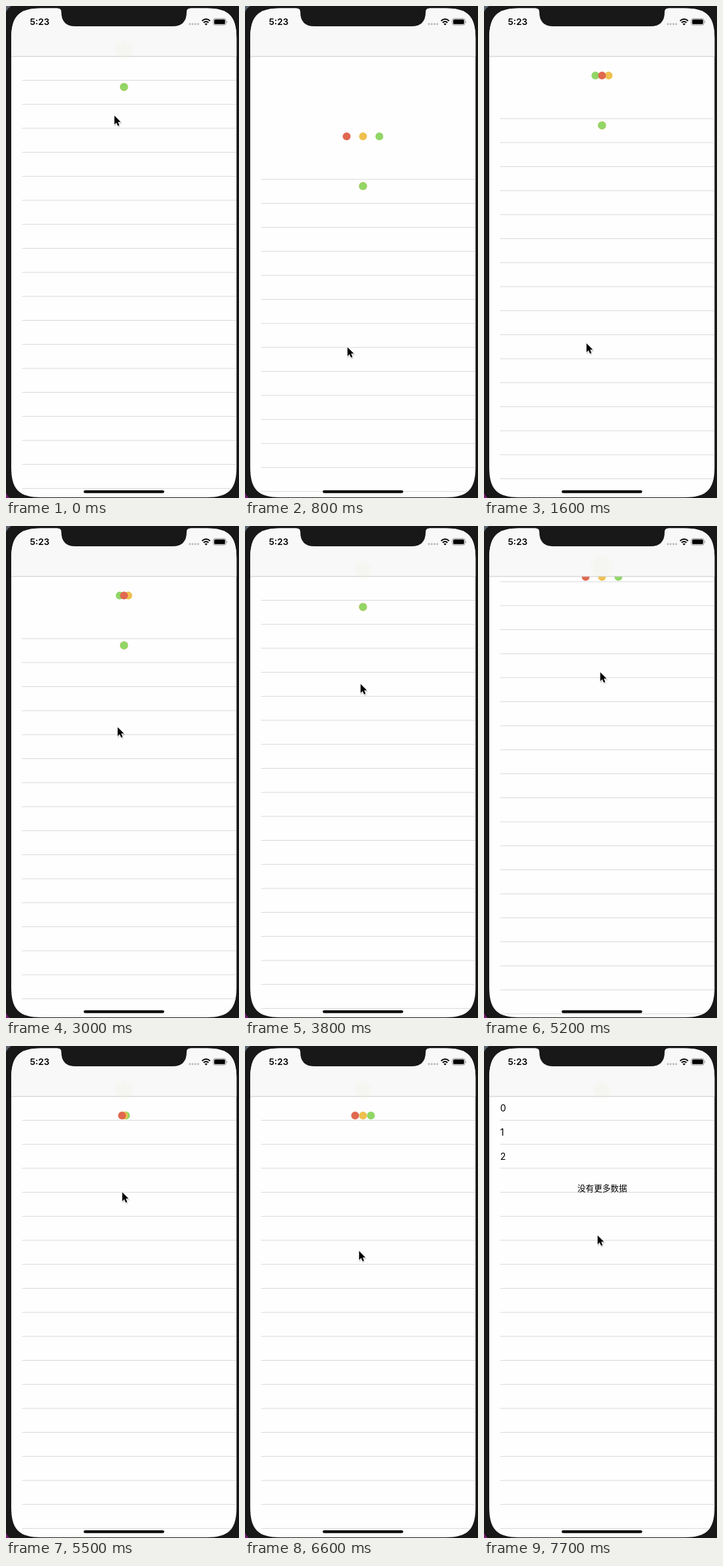
An HTML page for the animation above (8 s loop, 356 by 752 pixels).

```html
<!DOCTYPE html>
<html lang="zh">
<head>
<meta charset="utf-8">
<title>Pull to refresh</title>
<style>
  html, body { margin: 0; width: 100%; height: 100%; overflow: hidden; background: #181818; }
  svg { display: block; width: 356px; height: 752px; }
  .clock { font: 600 13.6px Inter, "Liberation Sans", sans-serif; }
  .row { font: 400 14.2px Inter, "Liberation Sans", sans-serif; }
  .note { font: 400 12.7px "Noto Sans CJK SC", "Noto Sans CJK", sans-serif; }
</style>
</head>
<body>
<svg viewBox="0 0 356 752">
  <defs>
    <clipPath id="screen"><path id="outline"/></clipPath>
    <radialGradient id="haze">
      <stop offset=".5" stop-color="#dfe6c0" stop-opacity=".13"/>
      <stop offset="1" stop-color="#dfe6c0" stop-opacity="0"/>
    </radialGradient>
    <path id="arrow" d="M0 0V15.5L3.6 12.2L6 17.8L8.6 16.7L6.2 11.2H11Z"/>
  </defs>

  <rect width="356" height="752" fill="#181818"/>
  <path d="M0 0H8Q3 3 0 9Z" fill="#5d6772"/>
  <path d="M0 744Q2 749 6 752H0Z" fill="#7a1a72"/>

  <g clip-path="url(#screen)">
    <rect width="356" height="752" fill="#fefefe"/>
    <g id="lines" fill="#d9d9da"></g>
    <g id="rows"></g>
    <text id="note" class="note" x="180.7" y="221.6" text-anchor="middle">没有更多数据</text>
    <g id="head"></g>
    <g id="foot"></g>
    <rect width="356" height="77" fill="#f8f8f8"/>
    <rect y="76.6" width="356" height="1" fill="#cbcbcb"/>
    <circle id="glow" cx="180" fill="url(#haze)"/>
  </g>

  <path d="M79 0V3.5Q84.5 3.5 84.5 9Q84.5 31 106 31H254.500Q276 31 276 9Q276 3.500 281.500 3.500V0Z" fill="#181818"/>
  <text class="clock" x="36.5" y="29">5:23</text>
  <g id="signal" fill="#bdbdbd"></g>
  <g fill="none" stroke="#000" stroke-width="2">
    <path d="M299.6 22.8Q305.7 17.2 311.8 22.8"/>
    <path d="M302 25.4Q305.7 22 309.4 25.4"/>
  </g>
  <path d="M303.5 27.3Q305.7 25.6 307.9 27.3L305.7 29.6Z"/>
  <rect x="316.7" y="19.2" width="19.4" height="10" rx="2.8" fill="none" stroke="#8d8d8d" stroke-width=".9"/>
  <rect x="318.1" y="20.6" width="16.6" height="7.2" rx="1.6"/>
  <path d="M337.1 22.4Q339 24.2 337.1 26Z" fill="#8d8d8d"/>
  <rect x="118.7" y="740.2" width="123" height="4.2" rx="2.1"/>

  <g id="cursor">
    <use href="#arrow" x=".8" y="2" stroke="#000" stroke-width="1.5" opacity=".16"/>
    <use href="#arrow" stroke="#fff" stroke-width="1.4" paint-order="stroke"/>
  </g>
</svg>
<script>
const LOOP = 8000, STEP = 100;
const PITCH = 36.7, FIRST = 113, MID = 180.3, SPREAD = 25, TRIGGER = 58.6;
const HALF = 239;                       // time for the dots to close or open
const HEAD_FREE = 1000, HEAD_ON = 1265, HEAD_OFF = 3265;
const PULL = 4600, FOOT_FREE = 5050, FOOT_ON = 5290, LOADED = 7400;
const COLORS = ['#e0684f', '#efc050', '#91d666'];

const $ = id => document.getElementById(id);
const clamp = v => Math.max(0, Math.min(1, v));
const smooth = u => u * u * (3 - 2 * u);
const show = (el, on) => el.setAttribute('visibility', on ? 'visible' : 'hidden');

function add(parent, tag, attrs) {
  const el = document.createElementNS('http://www.w3.org/2000/svg', tag);
  for (const k in attrs) el.setAttribute(k, attrs[k]);
  return parent.appendChild(el);
}

// Rounded box whose corners curve in gradually
function softBox(l, t, r, b, reach, pull) {
  return `M${l} ${t + reach}C${l} ${t + pull} ${l + pull} ${t} ${l + reach} ${t}
    H${r - reach}C${r - pull} ${t} ${r} ${t + pull} ${r} ${t + reach}
    V${b - reach}C${r} ${b - pull} ${r - pull} ${b} ${r - reach} ${b}
    H${l + reach}C${l + pull} ${b} ${l} ${b - pull} ${l} ${b - reach}Z`;
}
$('outline').setAttribute('d', softBox(8, 3.5, 352.2, 751, 46, 12));

// Pointer stops: time, x, y
const stops = [
  [0, 166, 168], [800, 157, 522], [1600, 157, 516], [3000, 171, 308], [3600, 177, 242],
  [3800, 177, 242], [PULL, 177, 532], [4940, 178, 224], [5500, 178, 224], [6200, 175, 324], [7300, 174, 290]
];

function pointerAt(t) {
  const i = Math.max(1, stops.findIndex(s => t < s[0]));
  const [a, b] = t < stops.at(-1)[0] ? [stops[i - 1], stops[i]] : stops.slice(-2);
  const u = smooth(clamp((t - a[0]) / (b[0] - a[0])));
  return { x: a[1] + (b[1] - a[1]) * u, y: a[2] + (b[2] - a[2]) * u };
}

// Rubber-band resistance while dragging, and the decelerating return
const rubber = d => 682 * (1 - 1 / (Math.max(0, d) * 0.55 / 682 + 1));
const glide = (from, to, t, time) => to + (from - to) * (1 - clamp(t / time)) ** 3;
const dragDown = t => rubber(pointerAt(t).y - 168);
const dragUp = t => -rubber(479 - pointerAt(t).y);

function scrollAt(t) {
  if (t < HEAD_FREE) return dragDown(t);
  if (t < HEAD_OFF) return glide(dragDown(HEAD_FREE), TRIGGER, t - HEAD_FREE, 450);
  if (t < PULL) return glide(TRIGGER, 0, t - HEAD_OFF, 335);
  if (t < FOOT_FREE) return dragUp(t);
  return glide(dragUp(FOOT_FREE), 0, t - FOOT_FREE, 400);
}

const lines = Array.from({ length: 24 }, () => add($('lines'), 'rect', { x: 24.5, width: 328, height: 1 }));
for (let i = 0; i < 3; i++)
  add($('rows'), 'text', { class: 'row', x: 24.8, y: 100.3 + i * PITCH }).textContent = i;
for (let i = 0; i < 4; i++)
  add($('signal'), 'circle', { cx: 281 + i * 4.2, cy: 27.6, r: 1.6 });

const makeDots = id => [0, 1, 2].map(() => add($(id), 'circle', { r: 6 }));
const head = makeDots('head'), foot = makeDots('foot');

// Dots open with the pull; once loading they close, move one place on and reopen.
function setDots(dots, y, pull, elapsed) {
  const busy = elapsed >= 0;
  const shift = busy ? Math.floor((elapsed + HALF) / (2 * HALF)) : 0;
  const gap = SPREAD * (busy ? Math.abs(1 - (elapsed / HALF) % 2) : clamp(pull / TRIGGER));
  dots.forEach((dot, z) => {
    const c = busy ? 2 - z : z;
    dot.setAttribute('fill', COLORS[c]);
    dot.setAttribute('cx', MID + ((c + shift) % 3 - 1) * gap);
    dot.setAttribute('cy', y);
  });
}

function draw(t) {
  const s = scrollAt(t), loaded = t >= LOADED;

  lines.forEach((el, i) => el.setAttribute('y', FIRST + i * PITCH + s));

  show($('head'), t < HEAD_OFF + STEP);
  setDots(head, 47.7 + s, t < HEAD_FREE ? s : TRIGGER, t - HEAD_ON);

  const released = t >= FOOT_FREE;
  show($('foot'), !loaded);
  setDots(foot, (released ? 106.2 : 123.8) + s, released ? TRIGGER : -s, t - FOOT_ON);

  show($('rows'), loaded);
  $('note').setAttribute('opacity', clamp((t - LOADED + STEP) / 300));

  const p = clamp(-s / 70);
  $('glow').setAttribute('cy', 67 - 12 * p);
  $('glow').setAttribute('r', 16 + 9 * p);
  show($('glow'), s < 5);

  const { x, y } = pointerAt(t);
  $('cursor').setAttribute('transform', `translate(${x - 0.4} ${y - 0.5}) scale(.88)`);
}

const start = performance.now();
function tick() {
  const t = (performance.now() - start) % LOOP;
  draw(Math.floor(t / STEP) * STEP);
  requestAnimationFrame(tick);
}
tick();
</script>
</body>
</html>
```
